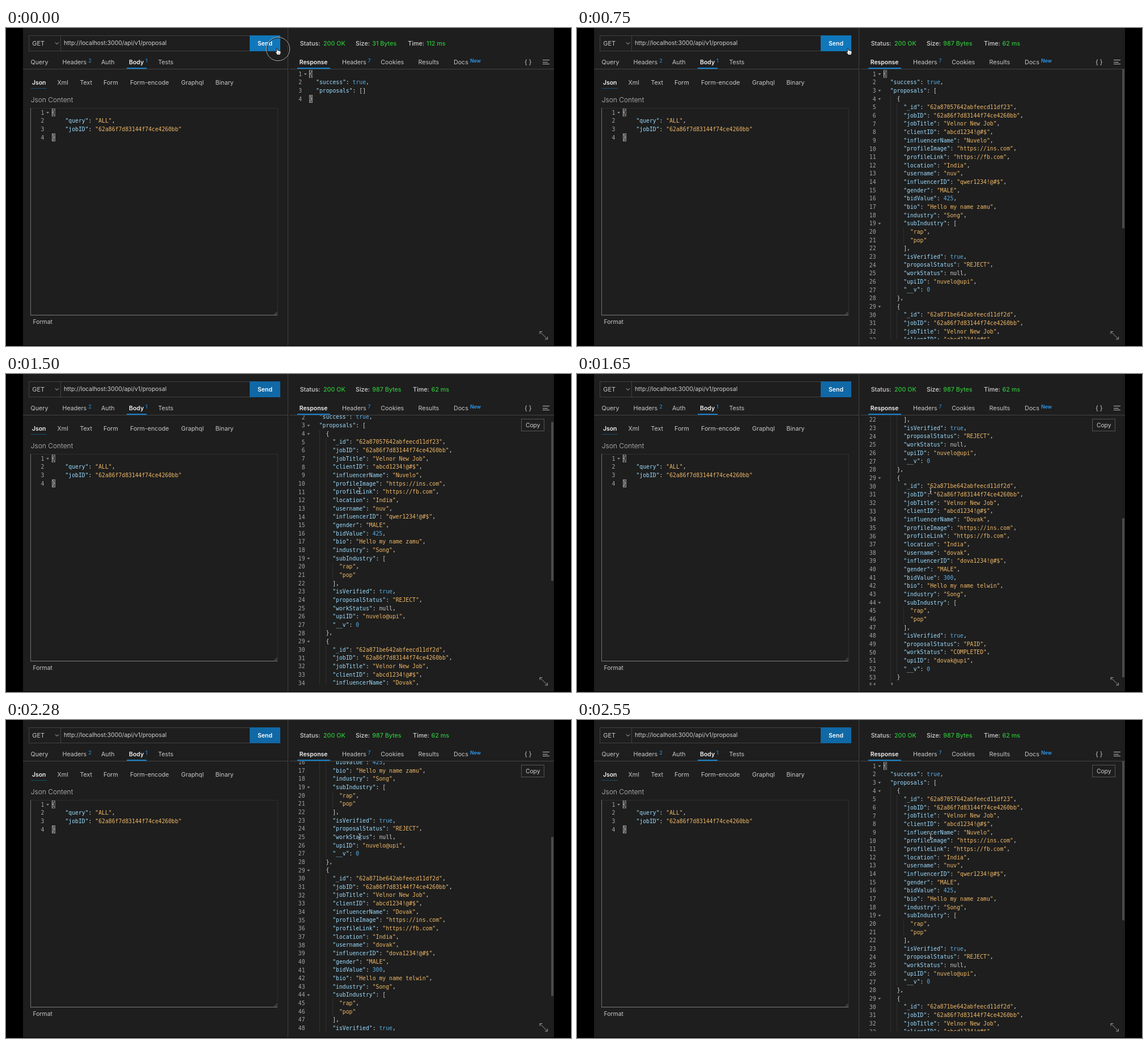
Write an HTML page with a canvas that moves like this. It is 997 by 561 pixels and loops after 3060 ms.

```html
<!DOCTYPE html>
<html lang="en">
<head>
<meta charset="utf-8">
<title>API client</title>
<style>
html, body { margin: 0; width: 100%; height: 100%; overflow: hidden; background: #000; }
canvas { display: block; }
</style>
</head>
<body>
<canvas id="stage" width="997" height="561"></canvas>
<script>
const ctx = document.getElementById('stage').getContext('2d');
const LOOP = 3060, STEP = 30;
const ROW = 14.654, CHAR = 5.87;
const VIEW = { top: 73.7, bottom: 549 };
const UI = 'Inter, Roboto, sans-serif';
const MONO = '9.75px "DejaVu Sans Mono", monospace';
const C = {
  bg: '#1e1e1e', text: '#c8c8c8', bright: '#f2f2f2', dim: '#8c8c8c', line: '#444',
  blue: '#1280cc', badge: '#2b9af3', green: '#2fc53a',
  key: '#9cdcfe', str: '#efb867', atom: '#58aee8', punct: '#d4d4d4'
};

const JOB = '62a86f7d83144f74ce4260bb';
function proposal(p) {
  return {
    _id: p.id, jobID: JOB, jobTitle: 'Velnor New Job', clientID: 'abcd1234!@#$',
    influencerName: p.name, profileImage: 'https://ins.com', profileLink: 'https://fb.com',
    location: 'India', username: p.user, influencerID: p.code + '1234!@#$', gender: 'MALE',
    bidValue: p.bid, bio: 'Hello my name ' + p.nick, industry: 'Song',
    subIndustry: ['rap', 'pop'], isVerified: true, proposalStatus: p.status,
    workStatus: p.work, upiID: p.name.toLowerCase() + '@upi', __v: 0
  };
}
const toLines = (data, indent) => JSON.stringify(data, null, indent).split('\n');
const request = toLines({ query: 'ALL', jobID: JOB }, 4);
const emptyReply = toLines({ success: true, proposals: [] }, 2);
const fullReply = toLines({
  success: true,
  proposals: [
    proposal({ id: '62a87057642abfeecd11df23', name: 'Nuvelo', user: 'nuv', code: 'qwer',
      bid: 425, nick: 'zamu', status: 'REJECT', work: null }),
    proposal({ id: '62a871be642abfeecd11df2d', name: 'Dovak', user: 'dovak', code: 'dova',
      bid: 300, nick: 'telwin', status: 'PAID', work: 'COMPLETED' })
  ]
}, 2);

// Keyed motion: [time, ...values]
const scrollKeys = [
  [1440, 0], [1470, 5], [1500, 19.6], [1530, 75], [1560, 145], [1590, 215], [1620, 270],
  [1650, 308], [1680, 330.6], [2160, 330.6], [2190, 329], [2220, 306], [2250, 270],
  [2340, 138.8], [2400, 70], [2460, 27], [2520, 4], [2550, 0]
];
const mouseKeys = [
  [960, 480, 41], [990, 482, 44], [1020, 492, 58], [1050, 515, 85], [1080, 548, 118],
  [1110, 580, 150], [1140, 605, 175], [1200, 617, 192], [1290, 623, 203], [1440, 624, 206]
];
function along(keys, t) {
  if (t <= keys[0][0]) return keys[0].slice(1);
  for (let i = 1; i < keys.length; i++) {
    const a = keys[i - 1], b = keys[i];
    if (t <= b[0]) {
      const u = (t - a[0]) / (b[0] - a[0]);
      return a.slice(1).map((v, k) => v + (b[k + 1] - v) * u);
    }
  }
  return keys[keys.length - 1].slice(1);
}

function rect(x, y, w, h, color) {
  ctx.fillStyle = color;
  ctx.fillRect(x, y, w, h);
}
function label(s, x, y, size = 10.7, color = C.text, weight = 400, align = 'left') {
  ctx.font = `${weight} ${size}px ${UI}`;
  ctx.textAlign = align;
  ctx.fillStyle = color;
  ctx.fillText(s, x, y + size * 0.36);
}
function stroke(color, width, ...points) {
  ctx.strokeStyle = color;
  ctx.lineWidth = width;
  ctx.beginPath();
  points.forEach(([x, y], i) => i ? ctx.lineTo(x, y) : ctx.moveTo(x, y));
  ctx.stroke();
}
function frame(x, y, w, h, color) {
  ctx.strokeStyle = color;
  ctx.lineWidth = 1;
  ctx.strokeRect(x, y, w, h);
}
function shape(points, fill) {
  ctx.beginPath();
  points.forEach(([x, y], i) => i ? ctx.lineTo(x, y) : ctx.moveTo(x, y));
  ctx.closePath();
  ctx.fillStyle = fill;
  ctx.fill();
}

function codeLine(line, x, base) {
  const tokens = /("[^"]*")(?=:)|("[^"]*")|(\btrue\b|\d+)|[^"\s\d]+/g;
  for (const m of line.matchAll(tokens)) {
    ctx.fillStyle = m[1] ? C.key : m[2] ? C.str : m[3] ? C.atom : C.punct;
    ctx.fillText(m[0], x + m.index * CHAR, base);
  }
}
function editor(lines, numX, codeX, top, scroll, indent) {
  lines.forEach((line, i) => {
    const y = top + (i + 0.5) * ROW - scroll;
    if (y < top - ROW || y > 560) return;
    ctx.font = MONO;
    ctx.textAlign = 'right';
    ctx.fillStyle = '#a6a6a6';
    ctx.fillText(i + 1, numX, y + 3.6);
    if (/[{[]$/.test(line)) {
      shape([[numX + 3.8, y - 1], [numX + 8.8, y - 1], [numX + 6.3, y + 2]], '#8a8a8a');
    }
    const depth = line.search(/\S/) / indent;
    for (let k = 1; k < depth; k++) {
      rect(Math.round(codeX + k * indent * CHAR), y - ROW / 2, 1, ROW, '#303030');
    }
    const last = i === lines.length - 1;
    if (i === 0 || last) {
      const bx = Math.round(codeX) + 0.5, by = Math.round(y - 7) + 0.5;
      if (last) rect(bx, by, 5, 13, '#3a3a3a');
      frame(bx, by, 5, 13, last ? '#999' : '#777');
      if (!last) rect(bx - 0.5, by, 1, 13, '#ccc');
    }
    ctx.textAlign = 'left';
    codeLine(line, codeX, y + 3.4);
  });
}

function leftPane(sendColor, sendText) {
  frame(40.5, 13.5, 390, 27, '#414141');
  rect(96, 13, 1, 28, '#414141');
  label('GET', 46.3, 27, 10.9, C.text);
  stroke('#c5c5c5', 1, [87, 25.5], [90, 28.5], [93, 25.5]);
  label('http://localhost:3000/api/v1/proposal', 102, 26, 10.35, '#d0d0d0');
  rect(430, 13, 54, 28, sendColor);
  label('Send', 457, 27, 10.5, sendText, 600, 'center');

  label('Query', 43.5, 60);
  label('Headers', 99.5, 60);
  label('2', 145.5, 57.5, 8.7, C.badge);
  label('Auth', 168, 60);
  label('Body', 217, 60, 10.5, C.bright, 600);
  label('1', 246, 57.5, 8.7, C.badge);
  label('Tests', 268.5, 60);
  rect(30, 72, 467, 1, C.line);
  rect(213, 70, 35, 2, C.blue);

  label('Json', 46, 96, 10.4, C.bright, 600);
  label('Xml', 90.5, 96);
  label('Text', 130.5, 96);
  label('Form', 172, 96);
  label('Form-encode', 219, 96);
  label('Graphql', 309, 96);
  label('Binary', 369.5, 96);
  rect(44, 106, 28, 1, '#17506f');

  label('Json Content', 43.7, 127, 12, '#c4c4c4', 300);
  frame(43.5, 141.5, 436, 365, '#2f2f2f');
  rect(43, 141, 1, 366, '#707070');
  rect(43, 506, 436, 1, '#7c7c7c');
  stroke('#888', 0.8, [473.5, 505.5], [478.5, 500.5]);
  stroke('#888', 0.8, [476.5, 505.5], [478.5, 503.5]);
  editor(request, 67.3, 81, 141.7, 0, 4);
  label('Format', 47.5, 518, 10.4);
}

function stat(name, value, x, valueX) {
  label(name, x, 27, 10.7, '#d2d2d2', 500);
  label(value, valueX, 27, 10.7, C.green, 500);
}
function rightHeader(busy, full) {
  if (busy) {
    label('Processing, Please Wait...', 518.7, 27, 10.5, '#d2d2d2', 500);
  } else {
    stat('Status:', '200 OK', 518.7, 560);
    stat('Size:', full ? '987 Bytes' : '31 Bytes', 617, 646.3);
    stat('Time:', full ? '62 ms' : '112 ms', full ? 718 : 709.3, full ? 750.5 : 742);
  }
  label('Response', 517.7, 60, 10.45, C.bright, 600);
  label('Headers', 593, 60);
  if (!busy) label('7', 638.5, 57.5, 8.7, C.badge);
  label('Cookies', 661.3, 60);
  label('Results', 727.5, 60);
  label('Docs', 790, 60);
  label('New', 819, 58, 8.7, C.badge, 600);
  label('{ }', 921.3, 60, 11, C.text, 400, 'center');
  rect(947, 56, 12, 1, '#bbb');
  rect(947, 60, 9, 1, '#bbb');
  rect(947, 63, 12, 1, '#bbb');
  rect(500, 72, 467, 1, C.line);
  rect(514, 70, 58, 2, C.blue);
}

function processing(t) {
  ctx.lineWidth = 2.8;
  ctx.strokeStyle = '#383838';
  ctx.beginPath();
  ctx.arc(732.5, 276, 12.3, 0, Math.PI * 2);
  ctx.stroke();
  const a = (145 + (t - 480) * 0.36) * Math.PI / 180;
  ctx.strokeStyle = '#1268a3';
  ctx.beginPath();
  ctx.arc(732.5, 276, 12.3, a, a + Math.PI / 2);
  ctx.stroke();
  label('Processing...', 732.5, 306, 10.25, C.dim, 400, 'center');
  label('Cancel Request', 732.5, 521, 10.1, C.dim, 400, 'center');
}

function response(full, scroll, copy) {
  ctx.save();
  ctx.beginPath();
  ctx.rect(500, 73, 467, VIEW.bottom - 73);
  ctx.clip();
  if (full) editor(fullReply, 527.5, 541, VIEW.top, scroll, 2);
  else editor(emptyReply, 522, 535.3, VIEW.top, 0, 2);
  ctx.restore();
  if (full) {
    const h = VIEW.bottom - VIEW.top, ratio = h / (fullReply.length * ROW);
    rect(962, 73 + scroll * ratio, 4, h * ratio, '#4b4b4b');
  }
  if (copy) {
    rect(909, 79, 41, 23, C.bg);
    frame(909.5, 79.5, 40, 21, '#555');
    label('Copy', 929.7, 90.5, 10.3, '#d0d0d0', 400, 'center');
  }
  stroke('#999', 1, [942, 535.5], [955.5, 549]);
  stroke('#999', 1, [942, 540], [942, 535.5], [946.5, 535.5]);
  stroke('#999', 1, [955.5, 544.5], [955.5, 549], [951, 549]);
}

function hand(x, y) {
  const p = [[-3, -5], [-1.4, -5], [-0.8, -1.5], [4.6, -0.2], [5, 2.5], [3.6, 6.5],
    [-1.2, 6.5], [-4.5, 1.6], [-3.6, 0.8], [-2.4, 1.8]];
  const pts = p.map(([a, b]) => [x + a, y + b]);
  shape(pts, '#fff');
  stroke('#111', 0.9, ...pts, pts[0]);
  for (const d of [0.5, 2.3]) stroke('#555', 0.6, [x + d, y + 2], [x + d, y + 5]);
}
function arrow(x, y) {
  const p = [[0, 0], [0, 11], [2.6, 8.6], [4.4, 12.4], [6, 11.6], [4.3, 8], [7.6, 8]];
  const pts = p.map(([a, b]) => [x + a, y + b]);
  shape(pts, '#000');
  stroke('#fff', 0.8, ...pts, pts[0]);
}
function beam(x, y) {
  for (const [color, w] of [['#000', 2.4], ['#e4e4e4', 1]]) {
    stroke(color, w, [x - 2.5, y - 6], [x, y - 4.5], [x + 2.5, y - 6]);
    stroke(color, w, [x, y - 4.5], [x, y + 4.5]);
    stroke(color, w, [x - 2.5, y + 6], [x, y + 4.5], [x + 2.5, y + 6]);
    stroke(color, w, [x - 1.5, y + 1.5], [x + 1.5, y + 1.5]);
  }
}
function pressRing() {
  for (const [r, color, w] of [[20.7, '#b0b0b0', 1], [19.5, '#161616', 1]]) {
    ctx.strokeStyle = color;
    ctx.lineWidth = w;
    ctx.beginPath();
    ctx.arc(480, 37, r, 0, Math.PI * 2);
    ctx.stroke();
  }
}

function draw(t) {
  const busy = t >= 480 && t < 720, full = t >= 720;
  const [mx, my] = along(mouseKeys, t);
  const onSend = my <= 41;
  const onReply = mx > 500 && my > 73;

  rect(0, 0, 997, 561, '#000');
  rect(30, 0, 937, 560, C.bg);
  rect(497, 0, 1, 560, '#414141');
  leftPane(busy ? '#b9bab9' : onSend ? '#1177bb' : '#1068a6', busy ? '#eee' : '#fff');
  rightHeader(busy, full);
  if (busy) processing(t);
  else response(full, along(scrollKeys, t)[0], onReply);

  if (t < 480) pressRing();
  if (onSend) hand(mx, my);
  else if (onReply) beam(mx, my);
  else arrow(mx, my);
}

const start = performance.now();
function tick() {
  const t = (performance.now() - start) % LOOP;
  draw(Math.floor(t / STEP) * STEP);
  requestAnimationFrame(tick);
}
tick();
</script>
</body>
</html>
```
